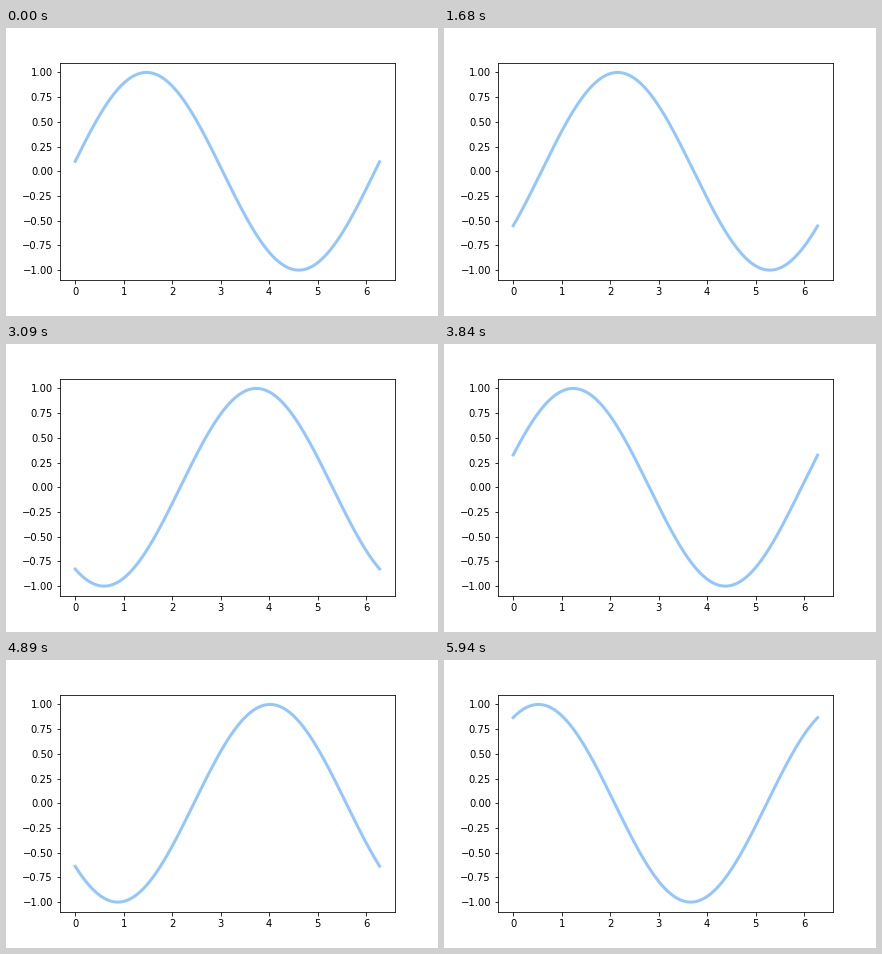
Recreate the animation shown at these times as a matplotlib script. Size 432 by 288 pixels, loop 5.97 s.

```python
import numpy as np
import matplotlib.pyplot as plt
from matplotlib.animation import FuncAnimation

FRAMES = 199
INTERVAL = 30  # ms

fig, ax = plt.subplots(figsize=(6, 4), dpi=72)
fig.subplots_adjust(left=0.125, right=0.9, bottom=0.125, top=0.88)

x = np.arange(0, 2 * np.pi, 0.01)
line, = ax.plot(x, np.sin(x), color="#92C6FF", lw=3)
# Fix the limits so the axes stay still while the wave travels.
ax.set_xlim(ax.get_xlim())
ax.set_ylim(ax.get_ylim())


def update(i):
    line.set_ydata(np.sin(x + (i + 1) / 10))
    return line,


anim = FuncAnimation(fig, update, frames=FRAMES, init_func=lambda: update(0),
                     interval=INTERVAL, repeat=True, repeat_delay=0)

plt.show()
```
